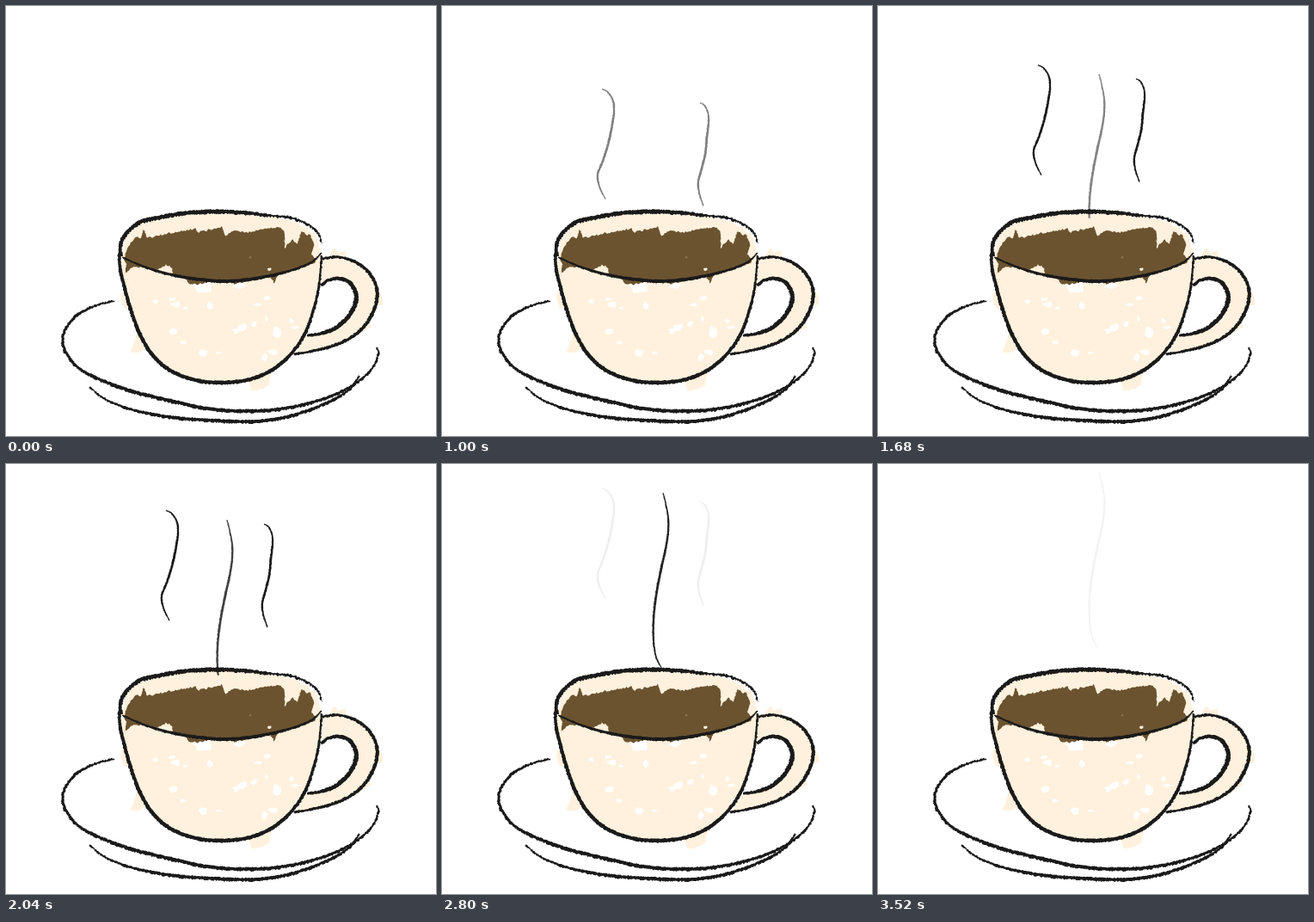
Recreate the animation shown at these times as an HTML page. Size 500 px wide and 500 px high, loop 4720 ms.

```html
<!DOCTYPE html>
<html lang="en">
<head>
<meta charset="utf-8">
<title>Coffee</title>
<style>
html, body { margin: 0; width: 100%; height: 100%; overflow: hidden; background: #fff; }
svg { display: block; width: 100vw; height: 100vh; }
</style>
</head>
<body>
<svg viewBox="0 0 500 500" id="stage"></svg>
<script>
const INK = '#1a1a1a', CREAM = '#fff1dd', COFFEE = '#6b5330';
const stage = document.getElementById('stage');
let seed = 7;
const rnd = () => (seed = seed * 16807 % 2147483647) / 2147483647;
const clamp = v => Math.max(0, Math.min(1, v));
const points = s => s.split(' ').map(p => p.split(',').map(Number));
const toPath = ps => ps.length ? 'M' + ps.map(p => p[0].toFixed(1) + ' ' + p[1].toFixed(1)).join('L') + 'Z' : '';

function shape(d, fill) {
  const el = document.createElementNS('http://www.w3.org/2000/svg', 'path');
  el.setAttribute('d', d);
  el.setAttribute('fill', fill);
  stage.appendChild(el);
  return el;
}

// Catmull-Rom curve through the points, about one sample per pixel
function curve(ps) {
  const out = [];
  for (let i = 0; i < ps.length - 1; i++) {
    const a = ps[Math.max(0, i - 1)], b = ps[i], c = ps[i + 1], d = ps[Math.min(ps.length - 1, i + 2)];
    const n = Math.ceil(Math.hypot(c[0] - b[0], c[1] - b[1]) / 1.2);
    for (let k = 0; k < n; k++) {
      const t = k / n;
      out.push([0, 1].map(j => b[j] + .5 * t * (c[j] - a[j] +
        t * (2 * a[j] - 5 * b[j] + 4 * c[j] - d[j] + t * (3 * (b[j] - c[j]) + d[j] - a[j])))));
    }
  }
  out.push(ps[ps.length - 1]);
  return out;
}

// Edge pairs of a tapered, slightly ragged stroke
function brush(str, w0, w1, w2, rough) {
  const c = curve(points(str)), last = c.length - 1;
  return c.map(([x, y], i) => {
    const a = c[Math.max(0, i - 2)], b = c[Math.min(last, i + 2)];
    const len = Math.hypot(b[0] - a[0], b[1] - a[1]) || 1;
    const nx = (a[1] - b[1]) / len, ny = (b[0] - a[0]) / len;
    const u = i / last, end = u < .5 ? w0 : w2;
    const w = end + (w1 - end) * Math.sin(Math.PI * u) ** .7;
    const l = w / 2 + (rnd() - .5) * rough, r = w / 2 + (rnd() - .5) * rough * .6;
    return { y, l: [x + nx * l, y + ny * l], r: [x - nx * r, y - ny * r] };
  });
}
const outline = b => toPath([...b.map(p => p.l), ...b.map(p => p.r).reverse()]);
const ink = (...args) => shape(outline(brush(...args)), INK);

// Polygon with small uneven teeth along its sides
function jag(str, amp, step) {
  const ps = points(str), out = [];
  ps.forEach(([x, y], i) => {
    const q = ps[(i + 1) % ps.length], n = Math.ceil(Math.hypot(q[0] - x, q[1] - y) / step);
    for (let k = 0; k < n; k++) {
      out.push([x + (q[0] - x) * k / n + (rnd() - .5) * amp * .4, y + (q[1] - y) * k / n + (rnd() - .5) * amp]);
    }
  });
  return toPath(out);
}

function speck(x, y, rx, ry, fill) {
  const ps = [];
  for (let i = 0; i < 9; i++) {
    const a = i / 9 * Math.PI * 2, k = .55 + rnd() * .65;
    ps.push([x + Math.cos(a) * rx * k, y + Math.sin(a) * ry * k]);
  }
  shape(toPath(ps), fill);
}

// Colour washes
shape(jag('136,288 138,272 148,259 158,251 163,245 172,247 205,242 250,240 295,243 328,247 350,258 361,268 367,290 364,325 357,355 346,383 330,405 310,422 306,441 297,447 285,446 282,437 250,438 220,435 195,426 174,410 162,398 152,404 145,402 150,388 153,374 145,350 137,352 133,340 137,325 133,305', 3, 4), CREAM);
shape(jag('367,294 376,291 381,281 386,288 394,283 396,292 410,297 423,309 431,325 438,339 438,347 430,349 422,366 425,374 414,380 401,387 380,396 338,404 347,384 366,381 385,373 399,359 406,344 405,330 398,321 386,316 374,320 366,325', 2.5, 4), CREAM);

points('208,351 197,347 193,341 237,348 304,340 293,347 316,379 332,366 275,373 268,378 247,403 194,379 206,391 301,408 303,364 337,374 288,370 174,344 229,404 310,403')
  .forEach(([x, y], i) => speck(x, y, 3 + i * 5 % 7 * .6, 2 + i * 3 % 5 * .7, '#fff'));
speck(228, 327, 13, 8, '#fff');
speck(271, 325, 9, 5, '#fff');
speck(315, 379, 5, 7, '#fff');
speck(361, 259, 5, 6, '#fff');

shape(jag('137,294 141,282 150,269 157,270 160,259 164,270 190,264 221,259 223,263 251,257 255,267 262,262 288,263 293,260 320,257 324,264 324,281 333,271 338,277 344,262 350,267 354,265 358,278 355,289 361,294 358,300 335,307 316,312 312,323 307,314 285,319 266,323 240,320 222,324 212,322 207,315 194,313 193,304 186,301 180,304 172,307 160,303 147,304 138,311 140,300', 2.4, 1.8), COFFEE);
speck(284, 292, 2, 1.5, '#8a7046');
speck(306, 306, 2.5, 2, CREAM);

// Cup
ink('134,291 133,280 136,270 144,260 157,251 178,246 208,241 245,239 285,241', 3.5, 5, 4.5, 1.8);
ink('285,241 310,244 330,246 347,252 359,260 365,268 367,277', 4, 3, .8, 2.4);
ink('135,292 160,303 190,312 225,318 260,320 295,316 330,308 355,298 367,287', 1.5, 4, 1.5, 1);
ink('133,277 132,300 138,328 148,362 160,390 175,411 195,426 220,435 248,438 280,435 308,424 330,406 347,382 358,352 364,325 367,290', 3.5, 4.6, 2, 1.2);

// Handle
ink('367,294 385,292 405,297 422,310 431,328 430,347 420,368 402,385 378,396 352,402 335,405', 2.5, 4, 2.5, 1.4);
ink('366,325 375,319 388,317 400,322 407,335 406,347 398,361 384,374 366,381 350,383', 3, 5.2, 3, 1.4);

// Saucer
ink('126,343 105,348 82,360 69,376 66,392 72,407 87,423 115,437 150,449 195,460 240,469 290,471 335,466 380,453 412,435 428,418 433,404 431,397', 2, 4.3, 2, 1.8);
ink('97,443 115,457 145,469 190,478 240,482 290,483 330,477 370,463 398,447 411,430', 1.5, 4.2, 2, 1.8);

// Steam: side wisps first, the long middle one later
const wisp = (str, delay, top, foot) => {
  const edge = brush(str, 1.2, 2.8, 1.2, .7);
  return { edge, delay, top, foot, y0: edge[0].y, y1: edge[edge.length - 1].y, el: shape('', INK) };
};
const sideTop = p => 128 * clamp(1 - p / .155) ** 2;
const sideFoot = p => 8 * clamp(1 - p / .25);
const midTop = p => 158 * clamp(1 - p / .21) ** 2;
const midFoot = p => 24 * (1 + Math.cos(Math.PI * clamp(p / .8)));
const wisps = [
  wisp('186,0 193,4 199,14 200,26 198,41 194,61 188,81 182,96 181,104 184,116 190,128', 0, sideTop, sideFoot),
  wisp('300,16 305,19 309,27 310,38 308,56 306,76 301,96 298,108 299,121 304,136', 0, sideTop, sideFoot),
  wisp('257,-18 260,-6 263,11 263,27 260,47 254,74 249,101 246,129 246,154 249,173 256,187', 700, midTop, midFoot)
];

function drawWisp(w, time) {
  const t = time - w.delay, p = clamp((t - 340) / 2500);
  const rise = 118 - 91 * (p - .17 * Math.sin(2 * Math.PI * p) / (2 * Math.PI));
  const from = w.y0 + w.top(p), to = w.y1 - w.foot(p);
  w.el.setAttribute('d', outline(w.edge.filter(e => e.y >= from - .01 && e.y <= to + .01)));
  w.el.setAttribute('transform', `translate(0 ${rise.toFixed(2)})`);
  w.el.setAttribute('opacity', Math.min(clamp((t - 340) / 1200), clamp((2860 - t) / 800)).toFixed(3));
}

const start = performance.now();
function tick() {
  const t = (performance.now() - start) % 4720;
  const held = Math.min(3520, Math.floor(t / 40) * 40);
  wisps.forEach(w => drawWisp(w, held));
  requestAnimationFrame(tick);
}
tick();
</script>
</body>
</html>
```
